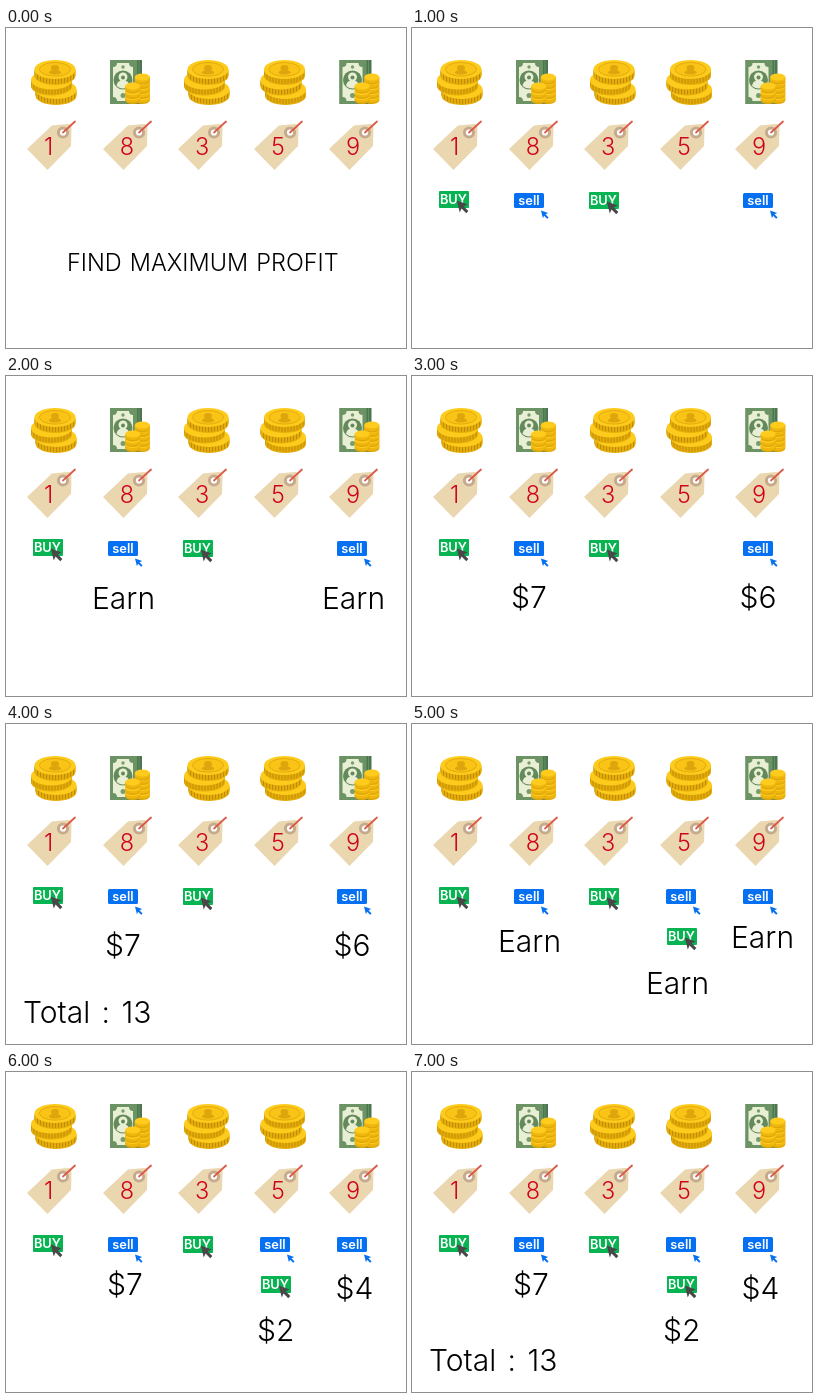
Write an HTML page that moves like this. It is 400 by 320 pixels and loops after 8 s.

```html
<!DOCTYPE html>
<html lang="en">
<head>
<meta charset="utf-8">
<title>Maximum profit</title>
<style>
  html, body { margin: 0; width: 100%; height: 100%; overflow: hidden; background: #fff; }
  svg { display: block; width: 400px; height: 320px; }
  text { font-family: Inter, "Open Sans", sans-serif; }
  .title { font-size: 23.5px; font-weight: 350; word-spacing: 1.5px; }
  .big { font-size: 30px; font-weight: 260; word-spacing: 3px; }
  .price { font-size: 23.5px; font-weight: 350; fill: #d0021b; text-anchor: middle; }
  .label { font-size: 12.8px; font-weight: 600; fill: #fff; text-anchor: middle; }
</style>
</head>
<body>
<svg viewBox="0 0 400 320">
  <defs>
    <pattern id="ridges" width="3" height="20" patternUnits="userSpaceOnUse">
      <path d="M0 0h3v20h-3z" fill="#e6ae08"/>
      <path d="M0 0h1.1v20h-1.1z" fill="#c08b08"/>
    </pattern>
    <g id="coin">
      <path d="M-20.5 0v6a20.5 9.5 0 0 0 41 0v-6z" fill="#e6ae08"/>
      <path d="M-20.5 1.5v3.5a20.5 9.5 0 0 0 41 0v-3.5z" fill="url(#ridges)"/>
      <ellipse rx="20.5" ry="9.5" fill="#fccb1c"/>
    </g>
    <g id="coins">
      <use href="#coin" x="25" y="29.5"/>
      <use href="#coin" x="20.5" y="20"/>
      <use href="#coin" x="24" y="9.5"/>
      <ellipse cx="24" cy="9.3" rx="15.5" ry="6.8" fill="#fac417" stroke="#e3ab0d"/>
      <path d="M17.5 13q1.5-3 5-3h3q3.500 0 5 3-6.500 3-13 0z" fill="#dda60c"/>
      <ellipse cx="24" cy="8" rx="4" ry="3" fill="#dda60c"/>
    </g>
    <g id="layer">
      <path d="M-7.5 0v4a7.5 3.4 0 0 0 15 0v-4z" fill="#e0a70a"/>
      <path d="M-7.5 0v2.5a7.5 3.4 0 0 0 15 0v-2.5z" fill="#efb70e"/>
      <ellipse rx="7.500" ry="3.500" fill="#ffcb1d"/>
    </g>
    <g id="cash">
      <path d="M0 0h32v44h-32z" fill="#4b7650"/>
      <path d="M0 0h27v44h-27z" fill="#6c9364"/>
      <path d="M29 0v44" stroke="#698f62"/>
      <path d="M7 3h12q0 4 4 4v30q-4 0-4 4h-12q0-4-4-4v-30q4 0 4-4z" fill="#e8efd4"/>
      <circle cx="13" cy="20" r="9.5" fill="#64895b"/>
      <path d="M6.500 26q1-5 4-5-2-2-2-4a4.500 4.500 0 0 1 9 0q0 2-2 4 3 0 4 5-6 5-13 0z" fill="#e8efd4"/>
      <circle cx="13" cy="17.500" r="2" fill="#64895b"/>
      <circle cx="13" cy="7" r="1.700" fill="#789d6c"/>
      <circle cx="13" cy="35.500" r="2.500" fill="#789d6c"/>
      <use href="#layer" x="32.3" y="36.5"/>
      <use href="#layer" x="32.3" y="31.5"/>
      <use href="#layer" x="32.3" y="26.5"/>
      <use href="#layer" x="32.3" y="21.5"/>
      <use href="#layer" x="32.3" y="17"/>
      <use href="#layer" x="22.7" y="36.5"/>
      <use href="#layer" x="22.7" y="31.5"/>
      <use href="#layer" x="22.7" y="26"/>
    </g>
    <g id="tag">
      <path d="M0 28L25 4.5 41 3q3 0 3.500 3l-.5 19-23.500 24z" fill="#ead7b0"/>
      <circle cx="36" cy="11.5" r="4.6" fill="#fff" stroke="#c5aa8e" stroke-width="3"/>
      <path d="M36 11.5L48 .5" stroke="#dc5746" stroke-width="1.7" stroke-linecap="round"/>
    </g>
    <path id="pointer" d="M0 0l10 3.6-3.7 1.7 4.2 4.3-1.9 1.9-4.3-4.2-1.6 3.5z"/>
    <g id="buy">
      <rect width="30" height="17" rx="1" fill="#08b452"/>
      <text class="label" x="14.4" y="13">BUY</text>
      <use href="#pointer" transform="translate(17.8 9.5) scale(1.1)" fill="#484848"/>
    </g>
    <g id="sell">
      <rect width="30" height="15" rx="1.5" fill="#0670f2"/>
      <text class="label" x="15" y="12">sell</text>
      <use href="#pointer" transform="translate(27 17.5) scale(.72)" fill="#0670f2"/>
    </g>
  </defs>
  <g id="board"></g>
  <g id="step"></g>
</svg>
<script>
const STEP_MS = 1000;
const use = (id, x, y) => `<use href="#${id}" x="${x}" y="${y}"/>`;
const big = (text, x, y) => `<text class="big" x="${x}" y="${y}">${text}</text>`;

const prices = [
  { value: 1, icon: "coins", iconX: 25, tagX: 21 },
  { value: 8, icon: "cash", iconX: 104, tagX: 97 },
  { value: 3, icon: "coins", iconX: 178, tagX: 172 },
  { value: 5, icon: "coins", iconX: 254.5, tagX: 248 },
  { value: 9, icon: "cash", iconX: 333.5, tagX: 323 },
];
document.getElementById("board").innerHTML = prices.map(p =>
  use(p.icon, p.iconX, 32) + use("tag", p.tagX, 93) +
  `<text class="price" x="${p.tagX + (p.value === 1 ? 21.5 : 24)}" y="127">${p.value}</text>`
).join("");

const title = '<text class="title" x="61" y="243">FIND MAXIMUM PROFIT</text>';
const total = big("Total : 13", 17, 298.5);
const twoTrades = use("buy", 27, 163) + use("sell", 102, 165) +
  use("buy", 177, 164) + use("sell", 331, 165);
const threeTrades = twoTrades + use("sell", 254, 165) + use("buy", 255, 204);
const twoProfits = twoTrades + big("$7", 99, 232) + big("$6", 327.5, 232);
const threeProfits = threeTrades + big("$7", 101, 223) +
  big("$2", 251, 269) + big("$4", 329.5, 227);

const steps = [
  title,
  twoTrades,
  twoTrades + big("Earn", 86, 232.5) + big("Earn", 316, 232.5),
  twoProfits,
  twoProfits + total,
  threeTrades + big("Earn", 86, 227.5) + big("Earn", 234, 269.5) + big("Earn", 319, 223.5),
  threeProfits,
  threeProfits + total,
];

const stage = document.getElementById("step");
let shown = -1;
function draw() {
  const index = Math.floor(performance.now() / STEP_MS) % steps.length;
  if (index !== shown) stage.innerHTML = steps[shown = index];
  requestAnimationFrame(draw);
}
draw();
</script>
</body>
</html>
```
